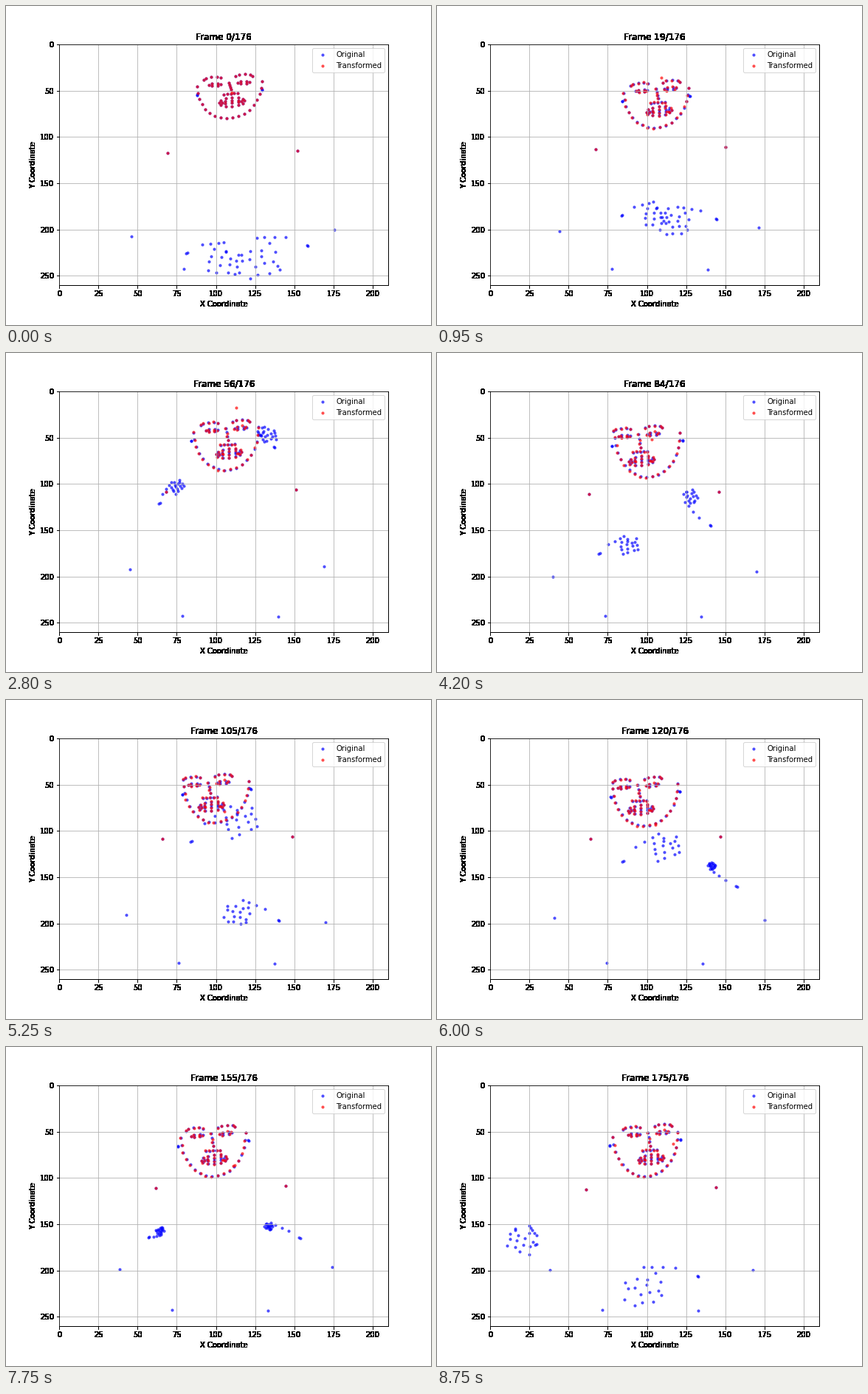
A matplotlib script that plays this animation: 576x432 px, repeating every 8800 ms.

```python
import numpy as np
import matplotlib.pyplot as plt
from matplotlib.animation import FuncAnimation

N = 176
KEYS = [0, 39, 56, 84, 105, 135, 175]

# Key poses in stage pixels, one row per key time.
# Head: point between the eyes, nod, sideways turn.
HEAD = [(302, 105, 0, 1), (291, 122, 0.9, -1), (298, 103, 0.8, 0), (273, 111, 1, 12),
        (274, 113, 0.6, 11), (270, 120, 0.8, 9), (286, 117, 1, -4)]
# Point between the shoulders.
TORSO = [(307, 198), (298, 187), (305, 187), (294, 190), (300, 187), (291, 188), (290, 192)]
# Hands: wrist, middle of the fingers, size (negative when the palm is turned).
LEFT = [(244, 335, 295, 346, 18), (256, 228, 299, 217, 8), (207, 204, 232, 181, 7),
        (219, 272, 260, 261, 10), (250, 192, 318, 165, 18), (252, 247, 303, 235, 12),
        (133, 268, 114, 262, -16)]
RIGHT = [(409, 325, 343, 345, 22), (347, 251, 302, 240, 9), (364, 128, 351, 110, 9),
         (371, 234, 344, 194, -8), (370, 299, 314, 290, 14), (443, 207, 431, 158, -19),
         (354, 311, 281, 328, 21)]

rng = np.random.default_rng(4)
drift = rng.normal(0, 0.7, (69, 2))
curl = rng.normal(0, 0.12, (2, 16, 2))


def pose(rows, i):
    """Ease from one key pose to the next."""
    rows = np.array(rows, float)
    k = min(np.searchsorted(KEYS, i, side="right") - 1, len(KEYS) - 2)
    t = (i - KEYS[k]) / (KEYS[k + 1] - KEYS[k])
    return rows[k] + (rows[k + 1] - rows[k]) * t * t * (3 - 2 * t)


def line(a, b, ts):
    a, b = np.array(a, float), np.array(b, float)
    return a + np.outer(ts, b - a)


def arc(cx, cy, rx, ry, angles):
    return np.c_[cx + rx * np.cos(angles), cy + ry * np.sin(angles)]


def ring(cx, cy, rx, ry, n):
    return arc(cx, cy, rx, ry, np.arange(n) * 2 * np.pi / n)


def tilt(p):
    p = np.array(p, float)
    p[:, 1] -= 0.08 * p[:, 0]
    return p


def face(nod, turn):
    """Landmarks around the point between the eyes; a nod lowers nose, mouth and chin."""
    nose, mouth, chin = 14 + 9 * nod, 25 + 10 * nod, 47 + 11 * nod
    jaw = arc(turn, 1, 44, chin - 1, np.linspace(np.pi, 0, 18))
    jaw[:, 0] += 3 * nod * (jaw[:, 1] / chin)
    brow = arc(0, -7, 12.5, 4, np.linspace(1.05, 1.85, 5) * np.pi)
    return tilt(np.vstack([
        jaw,
        brow - [22, 0],
        brow * [-1, 1] + [20, 0],
        ring(-19.5, 0, 8, 1.6, 6),
        ring(19.5, 0, 8, 1.6, 6),
        line((0, -1), (3, nose - 6), np.linspace(0, 1, 4)),
        line((-7, nose), (12, nose), np.linspace(0, 1, 5)),
        ring(4, mouth, 17, 6, 12),
        ring(4, mouth, 13, 1.6, 8),
    ]))


def hand(h, side, noise):
    """Wrist, a thumb chain and four fingers of four joints each."""
    wrist, mid, size = h[:2], h[2:4], h[4]
    ahead = (mid - wrist) / np.hypot(*(mid - wrist))
    across = side * np.sign(size) * np.array([ahead[1], -ahead[0]])
    size = max(abs(size), 4)
    tip = mid + size * (1.4 * across - 0.3 * ahead)
    bend = wrist + 0.4 * (tip - wrist) + 0.35 * size * across
    thumb = np.vstack([bend, line(bend, tip, [0.4, 0.75, 1])])
    u, v = np.meshgrid([-1, -0.25, 0.4, 1], np.linspace(-0.75, 0.75, 4))
    fingers = mid + size * (np.outer(u, ahead) + np.outer(v, across) + noise)
    return np.vstack([wrist, wrist + [side * 1.5, -1], thumb, fingers])


def points(i):
    x, y, nod, turn = pose(HEAD, i)
    torso, left, right = pose(TORSO, i), pose(LEFT, i), pose(RIGHT, i)
    head = np.array([x, y])
    f = head + face(nod, turn)
    shoulders = torso + np.array([[-88, 1], [88, -2]])
    hips = torso[0] - 2 + np.array([-64, 66]), [356, 357]
    elbows = [(torso[0] - 137, 262 + 0.15 * left[1]), (318 + 0.31 * right[0], 280 + 0.07 * right[1])]
    ear = 44 + 4 * nod
    ears = head + tilt([(turn - ear, 12), (turn + ear, 12)])
    blue = np.vstack([f, shoulders, ears, ears + 0.4, np.transpose(hips), elbows,
                      hand(left, 1, curl[0]), hand(right, -1, curl[1])])
    stray = head + [4 + 30 * i / N, 12 - 45 * np.sin(2 * np.pi * i / N)]
    red = np.vstack([f + min(i / 10, 1) * drift, shoulders, stray])
    return to_data(blue), to_data(red)


def to_data(p):
    return (p - [72, 51.84]) * [210 / 446.4, 260 / 326.16]


def solid(image, dpi):
    """Turn every touched pixel fully black."""
    out = np.zeros_like(image)
    out[..., 3] = image[..., 3] > 0
    return out, 0, 0


fig, ax = plt.subplots(figsize=(8, 6), dpi=72)
fig.subplots_adjust(left=0.125, right=0.9, bottom=0.125, top=0.88)
blue_dots = ax.scatter([], [], s=10, c="blue", alpha=0.6, label="Original")
red_dots = ax.scatter([], [], s=10, c="red", alpha=0.6, label="Transformed")
ax.set_xlim(0, 210)
ax.set_ylim(260, 0)
ax.set_xticks(range(0, 201, 25))
ax.set_yticks(range(0, 251, 50))
ax.set_xlabel("X Coordinate")
ax.set_ylabel("Y Coordinate")
ax.grid(True)
ax.legend(loc="upper right")
title = ax.set_title("Frame 0/176")
for part in [title, ax.xaxis.label, ax.yaxis.label, ax.spines["right"], ax.spines["bottom"],
             *ax.get_xticklabels(), *ax.get_yticklabels(),
             *ax.get_xticklines(), *ax.get_yticklines()]:
    part.set_agg_filter(solid)


def update(i):
    blue, red = points(i)
    blue_dots.set_offsets(blue)
    red_dots.set_offsets(red)
    title.set_text(f"Frame {i}/{N}")
    return blue_dots, red_dots, title


anim = FuncAnimation(fig, update, frames=N, interval=50, repeat=True, repeat_delay=0, blit=False)
plt.show()
```
